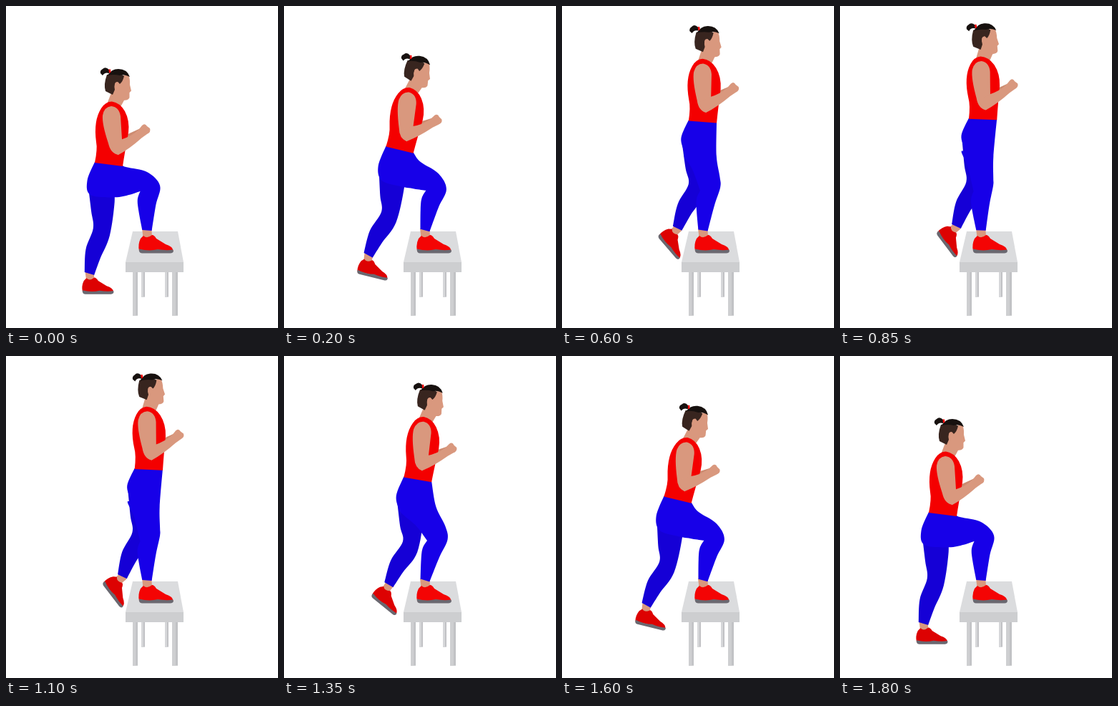
Write an HTML page that moves like this. It is 380 px wide and 450 px high and loops after 1850 ms.

```html
<!DOCTYPE html>
<html lang="en">
<head>
<meta charset="utf-8">
<title>Step-up exercise</title>
<style>
  html, body { margin: 0; width: 100%; height: 100%; overflow: hidden; background: #fff; }
  svg { display: block; width: 380px; height: 450px; }
  .red { fill: #f40000; }
  .skin { fill: #d9987e; }
  .far-skin { fill: #cc8b70; }
  .blue { fill: #1700e8; }
  .far-blue { fill: #1500d6; }
  .sole { fill: #6a6870; }
  .hair { fill: #17110f; }
  .shaved { fill: #38251f; }
  #backShoe { color: #dd0202; }
  #frontShoe { color: #f40404; }
</style>
</head>
<body>
<svg viewBox="0 0 380 450">
  <defs>
    <g id="shoe">
      <path class="skin" d="M190 311H203.5L204 325L192 327Z"/>
      <path fill="currentColor" d="M192 321Q197 326 204 320Q207 320 210 325L223 333Q233 336 233.500 342L186 342Q184 333 188 325Z"/>
      <path class="sole" d="M186 339.500Q200 343 212 340Q224 342 233.500 340.500Q235 345 230 345.500H190Q185 345 186 339.500Z"/>
    </g>
  </defs>

  <g id="bench">
    <path fill="#d6d7d9" d="M189 372H194V407H189ZM222 372H227V407H222Z"/>
    <path fill="#cecfd1" d="M177 372H184V433H177ZM232 372H240V433H232Z"/>
    <path fill="#c1c2c5" d="M181.500 372H184V432H181.500ZM237 372H240V432H237ZM192 372H194V406H192ZM225 372H227V406H225Z"/>
    <path fill="#dbdcde" d="M177 315H240L248 358H167Z"/>
    <path fill="#cdced0" d="M167 358H248V372H167Z"/>
  </g>

  <use id="backShoe" href="#shoe"/>
  <path id="backLeg" class="far-blue"/>
  <use id="frontShoe" href="#shoe"/>
  <path id="frontLeg" class="blue"/>

  <g id="body">
    <path class="skin" d="M148 119L166 130L160 141L141 137Z"/>
    <path id="farArm" class="far-skin" d="M192 169L166 181L165 194L186 184Z"/>
    <path class="red" d="M124 219Q128 200 126 190Q122 160 133 143Q139 133.500 148 133.500Q159 135 166 147Q173 160 171 177Q166 204 163 224Z"/>
    <path class="skin" d="M148 99L171 96Q173.500 102 173 110L175 118.500L172.500 121L172.500 128Q171 132.500 163 131.500L156 134L148 122Z"/>
    <path class="shaved" d="M141 96Q136 110 139 119L149 124L152 117Q150 107 156 106L159 109Q163 106 165 98L158 93Z"/>
    <path class="hair" d="M142 97Q147 88 157 88Q169 88 173 99Q165 95 159 97Q150 95 142 97Z"/>
    <path class="hair" d="M144 89Q139 84 135 88Q131 90 132 94L135 97Q138 92 144 94Z"/>
    <path class="red" d="M143.500 88.500L146 88.500L146.500 93L144 93.500Z"/>
    <ellipse class="skin" cx="155" cy="111" rx="3.200" ry="4.800"/>
    <path id="upperArm" class="skin" d="M147 140Q158 141 160 154Q161 170 162 186Q163 200 157 208Q146 206 143 192Q134 165 135 153Q137 141 147 140Z"/>
    <path id="forearm" class="skin" d="M148 193L160 187Q176 182 186 172L190 167Q194 163 197 168L201 171Q203 176 197 179L190 184Q172 200 157 208Q147 205 148 193Z"/>
  </g>
</svg>

<script>
const LOOP = 1850, STEP = 50, RISE = 740, DOWN = 1800;
const WAIST = [143.5, 220.5], ANKLE = [197, 313.5];
const SHOULDER = "147 150", ELBOW = "152 203";

const el = id => document.getElementById(id);
const move = (id, value) => el(id).setAttribute("transform", value);
const add = (p, x, y) => [p[0] + x, p[1] + y];
const ease = x => (1 - Math.cos(Math.PI * x)) / 2;

// Smooth curve through a few points.
function curve(pts) {
  let d = pts[0].join(" ");
  for (let i = 0; i < pts.length - 1; i++) {
    const [a, b, c, e] = [pts[i - 1] || pts[i], pts[i], pts[i + 1], pts[i + 2] || pts[i + 1]];
    const p = [0, 1].map(n => b[n] + (c[n] - a[n]) / 6);
    const q = [0, 1].map(n => c[n] - (e[n] - b[n]) / 6);
    d += ` C${p} ${q} ${c}`;
  }
  return d;
}
const setPath = (id, ...curves) => el(id).setAttribute("d", `M${curves.map(curve).join(" L")}Z`);

// Returns f(along, forward): a point beside the line from a to b.
function bone(a, b) {
  const x = b[0] - a[0], y = b[1] - a[1], len = Math.hypot(x, y);
  return (along, forward) => add(a, x * along + y / len * forward, y * along - x / len * forward);
}

// Two bones of fixed length whose knee bends forward.
function leg(hip, ankle, thighLen, shinLen) {
  const d = Math.hypot(ankle[0] - hip[0], ankle[1] - hip[1]);
  const along = (thighLen ** 2 - shinLen ** 2 + d * d) / (2 * d);
  const bend = Math.sqrt(Math.max(0, thighLen ** 2 - along ** 2));
  const knee = bone(hip, ankle)(along / d, bend);
  return [bone(hip, knee), bone(knee, ankle)];
}

function drawFrontLeg(hip, waistFront, waistBack) {
  const [thigh, shin] = leg(hip, ANKLE, 68.5, 66);
  const kneePit = shin(0.18, -13);
  setPath("frontLeg",
    [waistFront, thigh(0.5, 20), thigh(0.93, 15), shin(0.04, 14), shin(0.45, 10), shin(1, 6.7)],
    [shin(1, -6.7), shin(0.6, -13.5), shin(0.36, -16), kneePit],
    [kneePit, thigh(0.6, -18), thigh(0.3, -23), add(hip, -15, 21), add(hip, -19.5, 1), waistBack]);
}

function drawBackLeg(hip, ankle) {
  const [thigh, shin] = leg(hip, ankle, 68.3, 62.3);
  setPath("backLeg",
    [thigh(0.1, -20), thigh(0.6, -15.5), shin(0, -13), shin(0.5, -14.5), shin(1, -7)],
    [shin(1, 7), shin(0.6, 8.5), shin(0.05, 12), thigh(0.4, 17), thigh(0.1, 15)]);
}

// p runs from 0, foot on the floor, to 1, upright on the bench.
function draw(p) {
  const swing = Math.sin(Math.PI * p);
  const x = 56 * p, y = -63 * p;
  const lean = 7.5 * swing - 5 * p ** 3;
  const upper = 12 * swing + 3 * p, fore = 9.5 * swing;

  move("body", `translate(${x} ${y}) rotate(${lean} ${WAIST})`);
  const upperTurn = `rotate(${upper - lean} ${SHOULDER})`;
  const foreTurn = `${upperTurn} rotate(${fore - upper} ${ELBOW})`;
  move("upperArm", upperTurn);
  move("forearm", foreTurn);
  move("farArm", foreTurn);

  const rad = lean * Math.PI / 180, cos = Math.cos(rad), sin = Math.sin(rad);
  const waist = (dx, dy) => add(WAIST, x + dx * cos - dy * sin, y + dx * sin + dy * cos);
  drawFrontLeg([133 + x, 243 + y], waist(19.5, 2.5), waist(-19.5, -2.5));

  const ankle = [116.5 + 46 * ease(p * p), 374 - 66 * p - 5 * swing];
  drawBackLeg([135 + x, 246 + y], ankle);
  move("backShoe", `translate(${ankle}) rotate(${53 * p ** 1.2}) scale(.91) translate(-196.5 -314)`);
}

const start = performance.now();
function tick() {
  const t = Math.floor((performance.now() - start) % LOOP / STEP) * STEP;
  const u = Math.max(0, Math.min(t, DOWN - t, RISE)) / RISE;
  draw(Math.sin(Math.PI / 2 * u) ** 1.27);
  requestAnimationFrame(tick);
}
tick();
</script>
</body>
</html>
```
